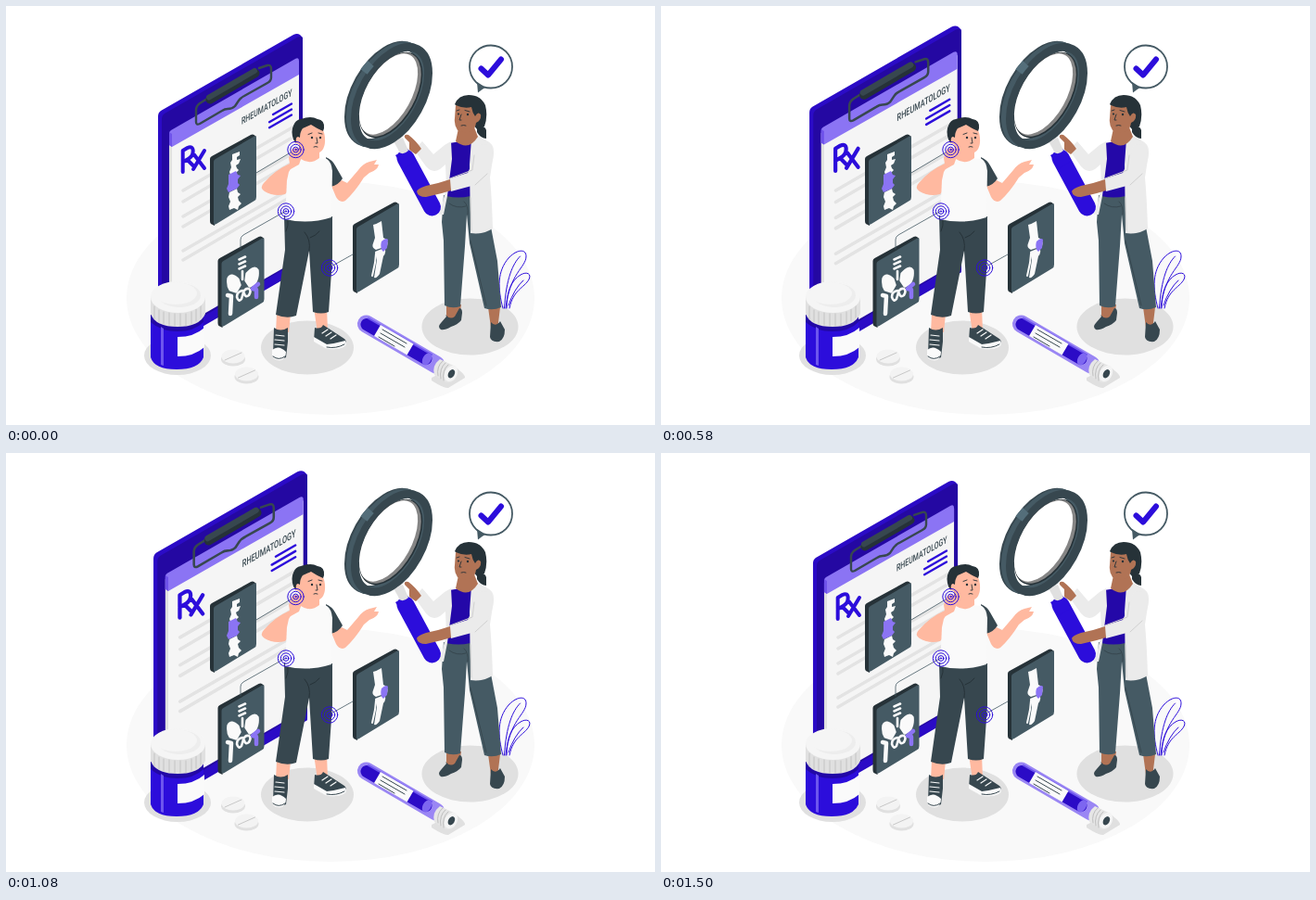
An HTML page for the animation above (1540 ms loop, 700 by 452 pixels).

```html
<!DOCTYPE html>
<html lang="en">
<head>
<meta charset="utf-8">
<title>Rheumatology</title>
<style>
html, body { margin: 0; width: 100%; height: 100%; overflow: hidden; background: #fff; }
svg { display: block; width: 100vw; height: 100vh; }
.slate { fill: #455a64; }
.dark { fill: #37474f; }
.ink { fill: #263238; }
.purple { fill: #2c0ddb; }
.lilac { fill: #8b74f4; }
.skin { fill: #ffb9a0; }
.brown { fill: #b17355; }
.white { fill: #fafafa; }
.coat { fill: #ebebeb; }
.shade { fill: #e0e0e0; }
.line { fill: none; stroke-linecap: round; stroke-linejoin: round; }
.thin { stroke: #455a64; stroke-width: .8; }
.violet { stroke: #2c0ddb; }
text { font: 500 10.4px Roboto, sans-serif; fill: #37474f; }
</style>
</head>
<body>
<svg viewBox="0 0 700 452">
<defs>
  <g id="panel">
    <path class="ink" d="M220 165q0-2 2-3l42-23q2-1 3.500 0l2.500 2-43 27-2 69-4-2q-1-1-1-3z"/>
    <path class="slate" d="M224 168q0-2 2-3l41-24q3-2 3 1v64q0 3-2 4l-41 25q-3 2-3-1z"/>
  </g>
  <g id="target" class="line violet">
    <circle r="8.700"/><circle r="5.700"/><circle r="2.900"/><circle r=".7"/>
  </g>
</defs>

<ellipse cx="350" cy="315" rx="220" ry="126" fill="#f9f9f9"/>
<g class="shade">
  <ellipse cx="325" cy="368.500" rx="50" ry="29"/>
  <ellipse cx="500.500" cy="346" rx="52" ry="30.500"/>
  <ellipse cx="185" cy="377" rx="36" ry="21"/>
  <path d="M459 401l25-12q12 9 11 12l-18 11q-4 1-18-8z"/>
</g>

<g id="board">
  <path fill="#2b0bc6" d="M164 119q0-4 3-6L310 31q4-2 7 0l3 3v249L172 369q-3 2-6 0l-2-3z"/>
  <path fill="#2408a2" d="M168 122q0-4 3-6L314 34q6-3 6 3v241q0 4-3 6L173 367q-5 3-5-2z"/>
  <path fill="#2b0bc6" d="M168 361L320 272v6q0 4-3 6L173 367q-5 3-5-2z"/>
  <path fill="#e0e0e0" d="M176 140L181 136V351L176 353z"/>
  <path fill="#f5f5f5" d="M179 139L316 60V273L179 352z"/>
  <path class="lilac" d="M176 138q0-3 2-4L312 57q4-2 4 2V74L179 152l-3-2z"/>
  <path fill="#6e52ea" d="M176 136l3 2v14l-3-2z"/>
  <path id="rules" class="line" stroke="#e3e3e3" stroke-width="3.400"/>
  <path class="line" stroke="#37474f" stroke-width="2.400" d="M217 100l-8 5q-4 3-4 7v13q0 4 4 2l24-14q3-2 6-2 5 0 8-3l4-6q2-3 6-5l25-14q4-2 4-6v-9q0-5-4-4l-9 3"/>
  <path class="line" stroke="#263238" stroke-width="9" d="M220 101L269 72.500"/>
  <path class="line" stroke="#37474f" stroke-width="6" d="M219 98.500L268 70"/>
  <text transform="matrix(.67 -.387 0 1 254 128)">RHEUMATOLOGY</text>
  <path class="line violet" stroke-width="2.300" stroke-linecap="butt" d="M288 117l20-11.500M284 125.300l24-13.800M284 131.300l24-13.800"/>
  <path class="line violet" stroke-width="4" stroke-linecap="butt" d="M190.700 179v-23l5-3q6-2.500 6 3.500 0 6-6 9l-5 3m5-2.500l7 7M203 160.500l11 14.500M214 156l-12 20"/>
</g>

<use href="#panel"/>
<use href="#panel" x="8.500" y="110"/>
<use href="#panel" x="154" y="73"/>

<g class="white">
  <path d="M244 160l8-3v4l-3 2v3l4-1-2 5-3 2 1 3 2 2-3 3-6 2-1-3 2-5-1-5 2-3z"/>
  <path d="M241 201l8-4 1 4 3 2-3 3 1 4 3 3-3 3-1 4-4-2-5 2-1-4 2-5-2-5z"/>
  <path class="lilac" d="M240 182l8-4 2 4 3 1-3 4v4l2 2-3 4-9 4-2-4 2-5z"/>
</g>
<g class="line" stroke="#fafafa" stroke-width="2.600">
  <path d="M251.500 273.500l6.500-3M251.500 278.500l6.500-3M251.500 283.500l6.500-3M255 286v9"/>
  <path stroke-width="3.400" d="M250 295q-7-7-10-1-1 7 2 12l6 2 4-7zM260 289q8-9 11-4 1 8-3 14l-5 3-4-6z" fill="#fafafa"/>
  <path d="M255 307q-6 1-6 7 2 6 5 2l2-7q2-5 6-4 3 2 0 7-4 3-5-2"/>
  <path stroke-width="4.500" d="M239 312l4 1-1 19"/>
  <path stroke="#8b74f4" stroke-width="4.500" d="M272 300l-6 5 4 1v8"/>
</g>
<g class="white">
  <path d="M396 236q4-1 9-4l2 18q6 2 4 9-3 4-6 2l-6 2q-5-2-3-7l2-6z"/>
  <path d="M398 265l10-4q3 4-1 9l-4 19q-3 5-6 4l3-19z"/>
  <path class="line" stroke="#fafafa" stroke-width="2" d="M399 267l-1 10-3 14"/>
  <path class="lilac" d="M405 254q5-5 7-2l-1 9-4 4q-4-3-2-11"/>
</g>
<path class="line thin" d="M270 180L312 155M253 262v-10q0-3 3-5L302 221M374 268L349 282"/>

<!-- patient -->
<g>
  <path class="skin" d="M292 332h15l-2 20h-14zM332 325h14l1 27-11 1z"/>
  <path class="dark" d="M289 347q7 5 15 0v15l-2 17q-8 5-14-2zM333 347q7 2 9-3l23 15q4 4 0 8-10 5-22 1l-11-7z"/>
  <path class="white" d="M287 371q7-6 15 2 0 7-5 9-8 1-10-5zM332 357l14 8q9-1 20-4 3 5-2 7-9 4-20 1l-12-7z"/>
  <path class="line" stroke="#fafafa" stroke-width="1.200" d="M291 355l9 1M290 360l10 1M290 365l10 1M341 353l6-4M345 356l6-4M350 359l6-4"/>
  <path class="line" stroke="#37474f" d="M288 378q6 5 13 0M346 368q10 2 19-3"/>
  <path class="dark" d="M300 226l52 1v45l-4 58q-8 3-17 0l-4-66-14 70q-10 4-22-1l10-70z"/>
  <path class="line" stroke="#263238" d="M327 264q2-12-5-20M338 243q-4 5-10 7M304 230q1 7-2 13"/>
  <path class="skin" d="M351 194l11-6 6 3 12-14q5-7 12-9l8-2-3 5 5 0q-1 6-10 9l-6 5q-10 16-20 25-6 3-10-4z"/>
  <path class="dark" d="M345 163q7 3 10 9l8 14q-4 7-13 9z"/>
  <path class="skin" d="M306 170l6-10q5-2 8 3l-5 12-8 16q-2 8-6 12-12 3-22-3-6-4-1-9 12-14 28-21"/>
  <path class="white" d="M312 168l8-4h14l12 1q5 3 6 13l-1 50q-25 8-50 2l2-42 2-9z"/>
  <path class="skin" d="M316 150q10 3 22-1v15q-10 8-20 1z"/>
  <path class="skin" d="M313 136q3-9 15-9 15 0 16 15 1 15-9 17-15 2-19-10-7-1-5-7 0-3 2-6"/>
  <path class="ink" d="M313 148l-3-4q-3-9 0-15 2-6 8-7 11-4 18 0 8 1 7 10l-1 3q-7-3-13-7l-9 4q-3 4-3 10l-2-1q-3 0-2 7z"/>
  <path class="line" stroke="#263238" stroke-width=".9" d="M326 138.500l4-1.500M337 137l4 1M335 142l1 6-2 0M332 152q2-1 4 0"/>
  <g class="ink"><circle cx="330" cy="142" r="1.200"/><circle cx="339" cy="142" r="1.200"/></g>
  <path class="skin" d="M305 164l3-9q5-4 9 0l3 5-4 11-9 5z"/>
</g>
<use href="#target" x="312.500" y="155"/>
<use href="#target" x="302" y="221.500"/>
<use href="#target" x="349" y="282.500"/>

<!-- pill bottle and tablets -->
<path class="purple" d="M156 333h57v46q-5 13-29 13t-28-13z"/>
<path fill="#2208a6" d="M156 333h57v8q-10 10-28 10t-29-10z"/>
<path fill="#6d55ee" d="M167 346l3 2v40l-3-1z"/>
<path class="white" d="M185 357q18 0 29-10v21q-11 10-29 10z"/>
<path class="shade" d="M156 313h59v19q-6 14-30 14t-29-14z"/>
<path class="line" stroke="#bdbdbd" stroke-width=".8" d="M160 324v14m5-10v13m5-11v13m6-12v13m6-12v13m6-13v13m6-13v13m6-15v13m5-16v13m5-17v13"/>
<ellipse cx="185.500" cy="314" rx="29.500" ry="17" fill="#f5f5f5"/>
<ellipse cx="187" cy="312" rx="23" ry="13" fill="#ededed"/>
<ellipse cx="183" cy="310" rx="23" ry="12" fill="#f5f5f5"/>
<g id="tablet">
  <ellipse cx="245" cy="381" rx="13" ry="7.500" class="shade"/>
  <ellipse cx="245" cy="378" rx="12.500" ry="7.500" fill="#f3f3f3"/>
  <path class="line" stroke="#c7c7c7" d="M236 382l18-8"/>
</g>
<use href="#tablet" x="14.500" y="19"/>

<!-- test tube -->
<g class="line">
  <path stroke="#9a86f4" stroke-width="19" d="M388.500 343L464 387"/>
  <path stroke="#2b0bc6" stroke-width="13" d="M389 343.500L453 380.500"/>
  <path stroke="#6d55ee" stroke-width="2" d="M391 337l68 39"/>
  <path stroke="#fafafa" stroke-width="14" stroke-linecap="butt" d="M400.500 350L436 370.500"/>
  <path stroke="#37474f" stroke-width="1" d="M406 349l26 15M404 353l26 15M402 357l17 10"/>
</g>
<ellipse cx="454" cy="381" rx="4.500" ry="7" transform="rotate(30 454 381)" fill="#7d66f0"/>
<path fill="#e6e6e6" d="M468 381l17 8q5 8-2 15-5 4-10 1l-11-7q-3-10 6-17"/>
<path class="line" stroke="#bdbdbd" d="M471 383q-7 6-5 16m8-14q-7 6-5 17m8-15q-7 6-5 17"/>
<ellipse cx="480" cy="396.500" rx="6.500" ry="9" transform="rotate(30 480 396.500)" fill="#f5f5f5"/>
<ellipse cx="480.500" cy="396.500" rx="3.300" ry="5" transform="rotate(30 480 396.500)" class="dark"/>

<!-- plant -->
<path class="line violet" d="M536 326c-6-22-6-40 6-54 8-9 19-11 19-2 0 12-18 18-22 56M537.500 326c2-32 9-48 17-56M540 326c0-18 5-30 15-36 7-4 12-1 9 5-5 9-17 11-21 31M542 323q6-18 16-27"/>

<!-- doctor -->
<path class="brown" d="M475 322h16l-2 14-8 7-6-3zM520 325h13l-3 25-7-3z"/>
<path class="dark" d="M475 335l-1-2q5 6 10 2l5-9q3 0 3 5l-1 8q-4 5-11 7-7 4-11 3-4-3 0-7zM523 341q5 6 10-1l5 9q0 10-6 13-9 1-10-5z"/>
<path class="slate" d="M472 204l30-1 20 30 8 42 4 50q-9 4-18 1l-16-70-3-31-2 34-5 65q-9 3-17-1l-1-70-2-20z"/>
<path class="line" stroke="#37474f" d="M498 225q1-10-4-14M478 213q8 6 18 3M501 253l17 70"/>
<path fill="#2408a8" d="M478 148l25-4-2 61q-13 3-26 0z"/>
<path class="coat" d="M480 146l-7 4-12 10-12-14-9 9 13 18q7 8 15 3l6-5 1 24-5 21-3 9h5l4-20 5-40zM502 143l7-3 9 5q9 4 8 14l-4 26q2 22 3 55-11 7-24 5l-1-74z"/>
<path class="brown" d="M488 132l17-1 4 10q-10 16-24 5z"/>
<path class="coat" d="M510 150q13-4 16 8 0 10-7 22-4 9-13 13l-26 7-4-13 22-7 8-17z"/>
<path class="line" stroke="#d0d0d0" d="M505 161l-2 16-24 9M501 207l1 35M519 181l-13 12"/>
<path class="ink" d="M508 129q9 0 10 5l0 9q-6 0-10-7z"/>
<path class="ink" d="M484 106q4-10 15-10 13 0 18 11 3 12-1 23l-8 3-16-20z"/>
<path class="brown" d="M485 107q9 4 17 2 1 6 4 10 3-6 6-2 1 6-5 9-1 7-5 9-9 3-15-1-4-6-3-13z"/>
<path class="line" stroke="#263238" stroke-width=".9" d="M486 113l3-1M495 112.500l5 1.500M491 117l-2 6 2 0M491 129q3-1 5 0"/>
<g class="ink"><circle cx="488" cy="116.500" r="1.100"/><circle cx="498" cy="117" r="1.200"/></g>

<!-- magnifier -->
<path class="line" stroke="#e0e0e0" stroke-width="9" stroke-linecap="butt" d="M422 144l8 14"/>
<path class="line violet" stroke-width="19" d="M431 164L459.500 217"/>
<path class="purple" d="M420 161l13-7 9 13-13 9z"/>
<g fill="none" stroke-width="9">
  <ellipse class="ring" stroke="#37474f" cx="409" cy="95"/>
  <ellipse class="ring" stroke="#455a64" cx="411" cy="95.500"/>
  <ellipse class="ring" stroke="#37474f" cx="416" cy="97"/>
  <path stroke="#546e7a" d="M386 71A32 57.500 29 0 1 393.500 62"/>
</g>
<ellipse cx="415" cy="96" rx="27.500" ry="50.500" transform="rotate(29 415 96)" fill="#263238"/>
<ellipse cx="414.500" cy="95.500" rx="26.500" ry="49.500" transform="rotate(29 414.500 95.500)" fill="#858585"/>
<ellipse cx="412.500" cy="95" rx="24.500" ry="48" transform="rotate(29 412.500 95)" fill="#fff"/>
<path fill="#e0e0e0" d="M422 145l6-3 6 14q-5 5-10 2z"/>
<path class="brown" d="M448 154q-6-9-14-15-5-1-4 3l5 5 0 8q4 3 7 5z"/>
<path class="brown" d="M479 187l-13 4-13 3q-9 3-10 6 1 6 10 6l17-4 10-3z"/>

<!-- speech bubble -->
<circle cx="523" cy="65.500" r="23" fill="#fff" stroke="#455a64" stroke-width="1.800"/>
<path class="slate" d="M508 82l9 6q-4 2-8 5.500z"/>
<path class="line violet" stroke-width="6" d="M512.500 67.500l7.500 7 14-17"/>
</svg>
<script>
const LOOP = 1540, STEPS = 37;
const beat = [[0, 1], [285, 1.1], [880, 1], [1190, 1.097], [1500, 1], [LOOP, 1]];
const board = document.getElementById("board");

document.getElementById("rules").setAttribute("d",
  [199, 211, 227, 238, 264, 274].map((y, i) => `M191 ${y}L${i % 2 ? 307 : 309} ${y - 68}`).join(""));

for (const ring of document.querySelectorAll(".ring")) {
  const at = name => ring.getAttribute(name);
  ring.setAttribute("rx", 32);
  ring.setAttribute("ry", 57.5);
  ring.setAttribute("transform", `rotate(29 ${at("cx")} ${at("cy")})`);
}

// Linear interpolation between the beat's key points
function scaleAt(t) {
  const i = beat.findIndex(([end]) => t < end);
  const [[t0, s0], [t1, s1]] = [beat[i - 1], beat[i]];
  return s0 + (s1 - s0) * (t - t0) / (t1 - t0);
}

function draw(now) {
  const step = Math.floor(now % LOOP / LOOP * STEPS + .2) % STEPS;
  const s = scaleAt(step * LOOP / STEPS);
  board.setAttribute("transform", `translate(242 200) scale(${s}) translate(-242 -200)`);
  requestAnimationFrame(draw);
}
draw(performance.now());
</script>
</body>
</html>
```
